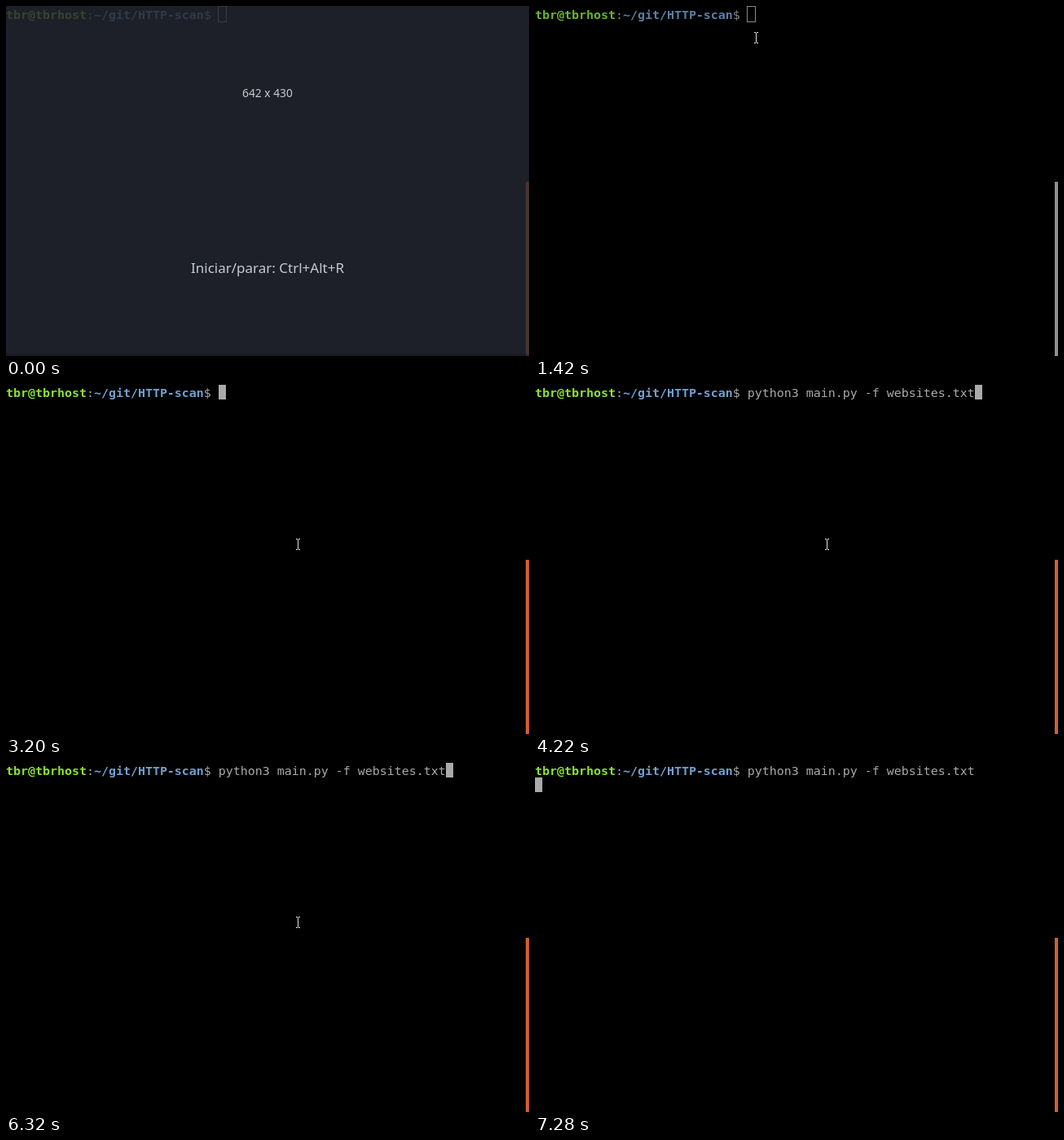
An HTML page for the animation above (8000 ms loop, 642 by 430 pixels).

```html
<!DOCTYPE html>
<html lang="en">
<head>
<meta charset="utf-8">
<title>Terminal</title>
<style>
  html, body { margin: 0; width: 100%; height: 100%; overflow: hidden; background: #000; }
  svg { display: block; width: 642px; height: 430px; --green: #8ae234; --blue: #729fcf; --text: #aaa; --bar: #d15e33; }
  svg.idle { --green: #6eb42a; --blue: #5b7fa5; --text: #888; --bar: #918f8b; }
  svg.veiled { --bar: #d15e33; }
  .shell { font: 14.95px "DejaVu Sans Mono", monospace; fill: var(--text); white-space: pre; }
  .user { font-weight: bold; fill: var(--green); }
  .path { font-weight: bold; fill: var(--blue); }
  #veil text { font-family: "Noto Sans", sans-serif; fill: #c6c9ce; text-anchor: middle; }
</style>
</head>
<body>
<svg id="stage" viewBox="0 0 642 430">
  <rect width="642" height="430"/>
  <text class="shell" x="0" y="16"><tspan class="user">tbr@tbrhost</tspan>:<tspan class="path">~/git/HTTP-scan</tspan>$ <tspan id="command"></tspan></text>
  <rect id="outline" x="260.5" y="0.5" width="10" height="19" fill="none" stroke="#888"/>
  <rect id="block" width="9" height="18" fill="#aaa"/>
  <rect x="638" y="216" width="4" height="214" fill="var(--bar)"/>
  <path id="beam" d="M0 .5H2M3 .5H5M2.5 1V13M0 13.5H2M3 13.5H5" fill="none" stroke="#e4e4e4"/>
  <g id="veil">
    <rect width="642" height="430" fill="#252932" fill-opacity=".8"/>
    <rect y="427" width="642" height="3" fill="#000" fill-opacity=".15"/>
    <text x="321" y="112" font-size="13.8">642 x 430</text>
    <text x="321" y="328" font-size="17">Iniciar/parar: Ctrl+Alt+R</text>
  </g>
</svg>
<script>
const LOOP = 8000;
const COMMAND = 'python3 main.py -f websites.txt';
const LINE_END = [540, 1];

// Each step changes only the listed properties from its time on.
const steps = [
  [0, { veil: true, focus: false, command: '', block: null, beam: null }],
  [20, { veil: false }],
  [1420, { beam: [269, 32] }],
  [1800, { beam: [287, 47] }],
  [2100, { beam: [290, 48] }],
  [2220, { focus: true, block: [261, 1] }],
  [2920, { beam: [356, 187] }],
  [3200, { beam: [356, 190] }],
  [4220, { command: COMMAND, block: LINE_END }],
  [4640, { block: null }],
  [6320, { block: LINE_END }],
  [7260, { beam: null }],
  [7280, { block: [0, 19] }]
];

const el = id => document.getElementById(id);
const show = (node, on) => node.setAttribute('visibility', on ? 'visible' : 'hidden');
const [stage, command, outline, block, beam, veil] =
  ['stage', 'command', 'outline', 'block', 'beam', 'veil'].map(el);

function place(node, pos) {
  show(node, pos);
  if (pos) node.setAttribute('transform', `translate(${pos})`);
}

function draw() {
  const t = performance.now() % LOOP;
  const state = Object.assign({}, ...steps.filter(s => s[0] <= t).map(s => s[1]));
  stage.classList.toggle('idle', !state.focus);
  stage.classList.toggle('veiled', state.veil);
  command.textContent = state.command;
  show(veil, state.veil);
  show(outline, !state.focus);
  place(block, state.block);
  place(beam, state.beam);
  requestAnimationFrame(draw);
}
draw();
</script>
</body>
</html>
```
